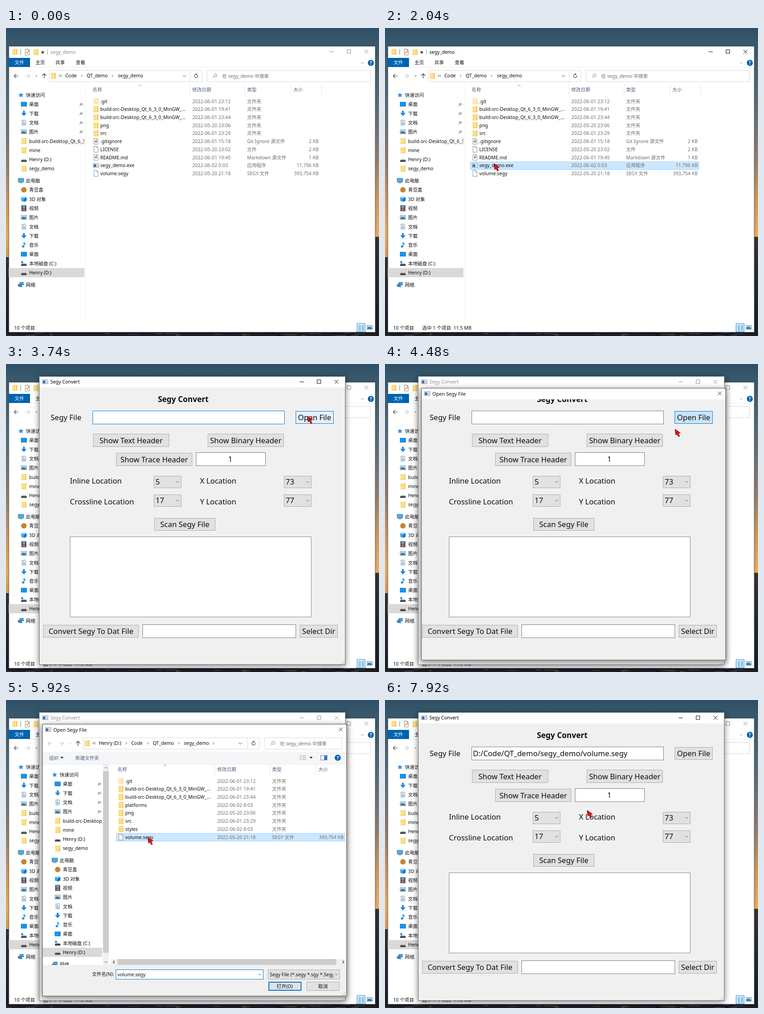
Animation, 823 px wide and 680 px high, one loop 7.99 s. Source, as an HTML page:

```html
<!DOCTYPE html>
<html lang="zh">
<head>
<meta charset="utf-8">
<title>Segy Convert</title>
<style>
html, body { margin: 0; width: 100%; height: 100%; overflow: hidden; background: #1c1e25; }
svg { display: block; }
text { font: 10.45px "Noto Sans", "Noto Sans CJK SC", "Noto Sans CJK", sans-serif; fill: #0c0c0c; white-space: pre; }
.dim { fill: #6d6d6d; }
.head { fill: #4c5f7c; }
.cap { fill: currentColor; }
.title { font-size: 10.65px; }
.big { font-size: 16.55px; }
.mid { text-anchor: middle; }
.end { text-anchor: end; }
.bold { font-size: 17px; font-weight: 700; }
.shade { filter: drop-shadow(0 3px 7px rgba(0, 0, 0, .5)); }
.soft { filter: drop-shadow(0 1px 3px rgba(0, 0, 0, .25)); }
</style>
</head>
<body>
<svg id="stage" width="823" height="680" viewBox="0 0 823 680"></svg>
<script>
const LOOP = 7990, ROW = 17.72, TOP = 153, TICK = 70;
const BLUE = '#0078d7', GREY = '#adadad', FACE = '#e1e1e1';

// drawing helpers
const text = (x, y, s, cls = '', more = '') => `<text x="${x}" y="${y}" class="${cls}" ${more}>${s}</text>`;
const box = (x, y, w, h, fill, line, more = '') => line
  ? `<rect x="${x + .5}" y="${y + .5}" width="${w - 1}" height="${h - 1}" fill="${fill}" stroke="${line}" ${more}/>`
  : `<rect x="${x}" y="${y}" width="${w}" height="${h}" fill="${fill}" ${more}/>`;
const line = (d, color = '#444', w = 1, fill = 'none', more = '') => `<path d="${d}" fill="${fill}" stroke="${color}" stroke-width="${w}" ${more}/>`;
const shape = (d, fill) => `<path d="${d}" fill="${fill}"/>`;
const dot = (x, y, r, fill) => `<circle cx="${x}" cy="${y}" r="${r}" fill="${fill}"/>`;
const move = (x, y, s) => `<g transform="translate(${x} ${y})">${s}</g>`;
const group = (id, s) => `<g id="${id}">${s}</g>`;
const clip = (x, y, w, h, s) => `<svg x="${x}" y="${y}" width="${w}" height="${h}" viewBox="${x} ${y} ${w} ${h}">${s}</svg>`;
const down = (x, y, c = '#555', r = 3) => line(`M${x - r} ${y - r / 2}l${r} ${r} ${r} ${-r}`, c);
const up = (x, y, c = '#555', r = 3) => line(`M${x - r} ${y + r / 2}l${r} ${-r} ${r} ${r}`, c);
const right = (x, y) => line(`M${x - 1.2} ${y - 2.6}l2.5 2.6 -2.5 2.6`, '#555');
const tri = (x, y, c = '#222') => shape(`M${x - 3.5} ${y - 2}h7l-3.5 4z`, c);
const help = (x, y) => dot(x, y, 6.7, '#0063b1') + text(x, y + 4, '?', 'mid', 'style="fill:#fff;font-weight:700"');

const page = line('M-4.5 -6.5h6l3 3v10h-9z', '#8c8c8c', 1, '#fff') + line('M1.5 -6.5v3h3', '#8c8c8c');
const folder = box(-5.5, -6.5, 11, 13, '#fddf88') + shape('M3.5 -6.5h2v13h-2z', '#f0c964') + shape('M-5.5 5.7h11v.8h-11z', '#e9c467');
const arrow = shape('M-2 -6h4v5h4l-6 7 -6 -7h4z', '#2a84d8');
const drive = shape('M-4.5 0h9l1.5 2.5h-12z', '#9a9a9a') + box(-6, 2, 12, 3.4, '#3c3c3c');
const screen = box(-6.5, -5.5, 13, 9, '#41b0f4', '#3d6f94') + box(-3.5, 4, 7, 1.5, '#6c8496');
const icons = {
  folder, page, drive, arrow, screen,
  pale: `<g opacity=".6">${folder}</g>`,
  gear: page + dot(0, .5, 2.6, '#777') + dot(0, .5, 1, '#fff'),
  mark: page + `<g transform="scale(.5)">${arrow}</g>`,
  app: box(-6.5, -5, 13, 10, '#fff', '#8a99a8') + box(-5, -2.5, 5.5, 6, '#2a6fb5') + box(1.5, -2.5, 3.5, 6, '#c5d3df'),
  star: shape('M0 -5.5l1.6 3.6 4 .3 -3 2.7 1 3.9 -3.6 -2 -3.5 2 .9 -3.9 -3 -2.7 4 -.3z', '#2f8fe0'),
  desk: box(-6.5, -5, 13, 10, '#1296f0', '#0a6fba'),
  doc: box(-4.5, -6, 9, 12, '#fff', '#7e93a6') + line('M-2.5 -3h3M-2.5 -.5h5M-2.5 1.5h5M-2.5 3.5h5', '#3f8fcf'),
  pic: box(-6.5, -5, 13, 10, '#fff', '#8b98a5') + box(-5, -3.5, 10, 4, '#8ccbf2') + shape('M-5 3.5v-3l4 -1.5 6 2v2.5z', '#3b6c88'),
  ball: dot(0, 0, 6, '#c9812f'),
  cube: shape('M-6 -4l6 -2.5 6 2.5 -6 2.5z', '#9fe0fb') + shape('M-6 -4l6 2.5v8l-6 -2.5z', '#36a9e4') + shape('M6 -4l-6 2.5v8l6 -2.5z', '#1173bb'),
  film: box(-5.5, -6.5, 11, 13, '#3a3d42') + box(-3, -5.5, 6, 5, '#6aa7d4') + box(-3, .5, 6, 5, '#a07c6c')
    + line('M-4.4 -6v12M4.4 -6v12', '#ddd', .8, 'none', 'stroke-dasharray="1 1.4"'),
  note: shape('M-.5 -6.5h1.5c0 3 4 3 3.5 7 -1 -2 -2 -2.4 -3.5 -2.6v5.5a2.8 2.3 0 1 1 -1.5 -2z', '#1a8ee0'),
  disk: drive + box(-6, -5, 4.5, 4.5, '#1b9ae8'),
  net: box(-3, -5.5, 9, 7, '#43aef0', '#2b6ea0') + box(-6.5, -1, 8, 5.5, '#2c8fd8', '#27608c') + box(-2, 4, 5, 1.6, '#587488')
};
const icon = (name, x, y) => move(x, y, icons[name]);

// shared panels
const places = [
  ['star', '快速访问'], ['desk', '桌面'], ['arrow', '下载'], ['doc', '文档'], ['pic', '图片'],
  ['folder', 'build-src-Desktop_Qt_6_3_0'], ['folder', 'mine'], ['drive', 'Henry (D:)'], ['folder', 'segy_demo'],
  ['screen', '此电脑'], ['ball', '青豆盒'], ['cube', '3D 对象'], ['film', '视频'], ['pic', '图片'], ['doc', '文档'],
  ['arrow', '下载'], ['note', '音乐'], ['desk', '桌面'], ['disk', '本地磁盘 (C:)'], ['drive', 'Henry (D:)'], ['net', '网络']
];
const placeY = (i, open) => i < 9 ? 148 + 20.3 * i : i < 20 ? 337 + 20.3 * (i - 9) : open ? 566.5 : 364;
function nav(width, pin, open) {
  const chosen = open ? 19 : 9;
  return places.map(([name, label], i) => {
    if (!open && i > 9 && i < 20) return '';
    const y = placeY(i, open), top = i % 20 === 0 || i === 9;
    return (i === chosen ? box(6, y - 10, width, 20.3, '#d9d9d9') : '')
      + icon(name, top ? 33 : 39.5, y) + text(top ? 44 : 51, y + 4, label)
      + (i > 0 && i < 5 ? line(`M${pin - 4} ${y + 4}l3 -3m-2 -2.5l4.5 4.5m-3 -4.5l3 3m-1 -4.5l4 4m-4 -3l-2 2`, '#8a8f96', 1.1) : '');
  }).join('');
}

const G = '文件夹';
const git = ['pale', '.git', '2022-06-01 23:12', G];
const buildA = ['folder', 'build-src-Desktop_Qt_6_3_0_MinGW_...', '2022-06-01 19:41', G];
const buildB = ['folder', buildA[1], '2022-06-01 23:44', G];
const png = ['folder', 'png', '2022-05-20 23:06', G];
const src = ['folder', 'src', '2022-06-01 23:29', G];
const volume = ['page', 'volume.segy', '2022-05-20 21:18', 'SEGY 文件', '393,754 KB'];
const mainRows = [git, buildA, buildB, png, src,
  ['gear', '.gitignore', '2022-06-01 15:18', 'Git Ignore 源文件', '2 KB'],
  ['page', 'LICENSE', '2022-05-20 23:02', '文件', '2 KB'],
  ['mark', 'README.md', '2022-06-01 19:45', 'Markdown 源文件', '1 KB'],
  ['app', 'segy_demo.exe', '2022-06-02 0:03', '应用程序', '11,796 KB'], volume];
const pickRows = [git, buildA, buildB, ['folder', 'platforms', '2022-06-02 8:03', G], png, src,
  ['folder', 'styles', '2022-06-02 8:03', G], volume];

function list(id, rows, chosen) {
  const head = [['名称', 191], ['修改日期', 411], ['类型', 532], ['大小', 634]].map(([s, x]) => text(x, 140, s, 'head')).join('');
  const rules = [405, 527, 628, 696].map(x => box(x, 124, 1, 26, '#e5e5e5')).join('');
  const body = rows.map(([name, label, date, kind, size = ''], i) => {
    const y = 161.5 + ROW * i;
    return icon(name, 198.5, y) + text(208, y + 4, label) + text(411, y + 4, date, 'dim', 'style="font-size:10.55px"')
      + text(532, y + 4, kind, 'dim') + text(690, y + 4, size, 'dim end');
  }).join('');
  return head + rules + up(296, 127, '#777')
    + box(188, 0, 505, 18, '#e5f3ff', '', `id="${id}Hover"`)
    + box(188, Math.round(TOP + ROW * chosen), 505, 18, '#cce8ff', '#99d1ff', `id="${id}Pick"`) + body;
}

function bar(w, chevron, back, crumbs, marks, sx, sw) {
  const r = 95 + w;
  return line('M28 106H18m4.5 -4.5l-4.5 4.5 4.5 4.5', back, 1.2) + line('M42 106h10m-4.5 -4.5l4.5 4.5 -4.5 4.5', '#c4c4c4', 1.2)
    + down(67, 106, back, 2) + line('M84.5 111v-10m-4.5 4.5l4.5 -4.5 4.5 4.5', '#444', 1.3)
    + box(95, 93, w, 26, '#fff', '#d9d9d9') + box(r - 27, 94, 1, 24, '#d9d9d9') + icon('folder', 104.5, 105.5)
    + line('M119.5 103l-2.5 2.5 2.5 2.5m3.5 -5l-2.5 2.5 2.5 2.5', '#333')
    + crumbs.map(([s, x]) => text(x, 109, s)).join('') + marks.map(x => right(x, 105.5)).join('')
    + down(chevron, 106, '#444', 3.5) + line(`M${r - 10} 104.5a3.7 3.7 0 1 1 -3 -2.3m-.5 -2l2 2 -2 1.8`, '#444', 1.2)
    + box(sx, 93, sw, 26, '#fff', '#d9d9d9')
    + line(`M${sx + 13} 110l3.5 -3.5a3.3 3.3 0 1 1 1 1`, '#777') + text(sx + 34, 109.5, '在 segy_demo 中搜索', 'dim');
}
const buttons = (x, y, gap) => line(`M${x} ${y}h9M${x + gap} ${y - 4.5}h8v8h-8zM${x + 2 * gap} ${y - 4.5}l8.5 8.5m0 -8.5l-8.5 8.5`, 'currentColor');
const grip = (x, y) => [[6, 0], [3, 3], [6, 3], [0, 6], [3, 6], [6, 6]].map(([a, b]) => box(x + a, y + b, 1.6, 1.6, '#b4b4b4')).join('');

function fade(id, stops) {
  const body = stops.map(([at, c]) => `<stop offset="${at}" stop-color="${c}"/>`).join('');
  return `<linearGradient id="${id}" x2="0" y2="1">${body}</linearGradient>`;
}
function wallpaper() {
  let seed = 7, bits = '';
  const rnd = () => (seed = seed * 16807 % 2147483647) / 2147483647;
  for (let i = 0; i < 34; i++) bits += box(rnd() * 820, 672 + rnd() * 7, 6 + rnd() * 22, 1 + rnd() * 2, ['#3b3a41', '#121319', '#4a423f'][i % 3]);
  return '<defs>'
    + fade('sky', [[0, '#2e5066'], [.06, '#3b5b6e'], [.25, '#5d7079'], [.42, '#937f72'], [.56, '#d49a5c'], [.67, '#f0ad5c'], [.75, '#dd9a55']])
    + fade('ground', [[0, '#34343b'], [.5, '#272930'], [1, '#1c1e25']]) + '</defs>'
    + box(0, 0, 823, 680, 'url(#sky)') + box(0, 506, 412, 174, 'url(#ground)') + box(412, 461, 411, 219, 'url(#ground)') + bits;
}

const explorer = group('explorer',
  box(6, 40, 809, 632, '#fff', '#75818a', 'class="soft"')
  + icon('folder', 19.5, 52.5) + box(32, 47, 1, 12, '#777') + move(47, 53, page) + line('M44.5 53l2 2.5 4 -5', '#c2782a', 1.3)
  + icon('folder', 66, 53) + box(78, 51, 6, 1, '#222') + tri(81, 55) + box(91, 47, 1, 12, '#999')
  + text(98, 57, 'segy_demo', 'cap') + buttons(714, 52.5, 38.5)
  + box(6, 66, 47, 20, '#0063b1') + text(19, 80, '文件', '', 'style="fill:#fff"')
  + text(65, 80, '主页') + text(109, 80, '共享') + text(154, 80, '查看')
  + down(786, 77, '#888') + help(805, 77) + box(7, 86, 807, 1, '#ececec')
  + bar(338, 394, '#444', [['Code', 131], ['QT_demo', 178], ['segy_demo', 247]], [167, 235], 443, 362)
  + clip(6, 120, 167, 530, nav(167, 166, true)) + box(175, 122, 1, 530, '#f2f2f2')
  + list('main', mainRows, 8)
  + text(18, 666, '10 个项目') + text(82, 666, '选中 1 个项目  11.5 MB', '', 'id="picked"')
  + box(774, 652, 19, 19, '#cce8ff', '#26a0da')
  + line('M778 657.5h5m2 0h5m-12 3h5m2 0h5m-12 3h5m2 0h5m-12 3h5m2 0h5', '#4c7896') + icon('pic', 802.5, 661));

const button = (x, y, w, h, s, id = '') => box(x, y, w, h, FACE, GREY, id && `id="${id}"`) + text(x + w / 2, y + h / 2 + 6, s, 'big mid');
const combo = (x, y, s) => box(x, y, 61, 27, FACE, GREY) + text(x + 4, y + 19.3, s, 'big') + down(x + 52.5, y + 13.5);
const widgets = group('widgets',
  text(391, 84, 'Segy Convert', 'bold mid') + text(98.5, 124, 'Segy File', 'big')
  + box(191, 103, 424, 30, '#fff', '#7a7a7a', 'id="field"') + box(194, 108, 1, 20, '#000', '', 'id="caret"')
  + text(194, 123.5, 'D:/Code/QT_demo/segy_demo/volume.segy', 'big', 'id="path"')
  + button(639, 104, 84, 28, 'Open File', 'open')
  + button(192, 154, 168, 29, 'Show Text Header') + button(445, 154, 168, 29, 'Show Binary Header')
  + button(243, 196, 168, 29, 'Show Trace Header') + box(419, 195, 154, 30, '#fff', '#7a7a7a') + text(495, 216, '1', 'big mid')
  + text(141, 264, 'Inline Location', 'big') + text(428, 264, 'X Location', 'big')
  + text(141, 309.5, 'Crossline Location', 'big') + text(428, 309.5, 'Y Location', 'big')
  + combo(326, 247, '5') + combo(326, 288, '17') + combo(613, 247, '73') + combo(613, 288, '77')
  + button(327, 340, 135, 28, 'Scan Segy File') + box(141, 381, 533, 178, '#fff', '#828790')
  + button(82, 576, 211, 28, 'Convert Segy To Dat File') + box(301, 575, 339, 30, '#fff', '#7a7a7a')
  + button(648, 576, 84, 28, 'Select Dir'));
const app = group('app',
  box(73, 27, 676, 637, '#f0f0f0', '#6b6b6b', 'class="shade" id="frame"') + box(74, 28, 674, 24, '#fff')
  + icon('app', 86.5, 39) + text(98, 43, 'Segy Convert', 'cap') + buttons(648, 39.5, 38.5) + grip(739, 655) + widgets);

const picker = group('picker',
  box(80, 53, 672, 601, '#f0f0f0', '#5e5e5e', 'class="shade"')
  + group('ghost', clip(81, 78, 670, 575, '<use href="#widgets"/>'))
  + box(81, 54, 670, 24, '#fff') + icon('app', 93, 65) + text(104.5, 69.5, 'Open Segy File', 'title') + line('M734.5 61l8 8m0 -8l-8 8', '#222')
  + group('content',
    box(81, 78, 670, 507, '#fff')
    + move(74.5, -10, bar(390, 442.5, '#c4c4c4', [['Henry (D:)', 130.5], ['Code', 202], ['QT_demo', 249.5], ['segy_demo', 318]], [191, 239, 307], 496, 171))
    + box(81, 114, 670, 27, '#f5f6f7') + box(81, 141, 670, 1, '#e8e9ea')
    + text(95, 131.5, '组织', 'head') + tri(123.5, 127.5, '#1f2d44') + text(153, 131.5, '新建文件夹', 'head')
    + line('M648 123.5h4m2 0h8m-14 4h4m2 0h8m-14 4h4m2 0h8', '#a3aab0', 1.6) + tri(673, 127.5, '#1f2d44')
    + box(694, 122, 15, 11, '#fff', '#4d82b4') + box(702, 123, 6, 9, '#2c7ac3') + help(732, 127.5)
    + group('shut', clip(81, 142, 147, 443, move(74.5, 17, nav(147, 146.5, false))))
    + group('wide', clip(81, 142, 132, 443, move(74.5, 17, nav(132, 131.5, true))) + right(458, 95.5)
      + box(214, 142, 13, 443, '#f0f0f0') + box(214, 157, 13, 401, '#cdcdcd') + up(220.5, 149.5) + down(220.5, 578.5))
    + clip(230, 140, 520, 430, move(55, 17, list('file', pickRows, 7)))
    + box(231, 572, 520, 13, '#f0f0f0') + box(246, 572, 483, 13, '#cdcdcd')
    + line('M239.5 575.5l-3 3 3 3M742.5 575.5l3 3 -3 3', '#333', 1.3)
    + text(238, 609, '文件名(N):', 'end') + box(242, 595, 326, 22, '#fff', BLUE) + down(560, 606)
    + text(246, 609.5, 'volume.segy', '', 'id="name"') + box(245, 599, 1, 14, '#000', '', 'id="bar"')
    + box(578, 595, 159, 22, FACE, GREY) + clip(580, 596, 142, 20, text(582, 609.5, 'Segy File (*.segy *.sgy *.Segy')) + down(729, 606)
    + box(579.5, 622.5, 72, 19, FACE, BLUE, 'id="ok" stroke-width="2"') + text(615, 635.5, '打开(O)', 'mid')
    + box(663, 622, 73, 20, FACE, GREY) + text(699.5, 635.5, '取消', 'mid')
    + grip(741, 645)));

const pointer = group('pointer', line('M0 0L1.5 13 4.3 10.6 7.5 16.5 10.2 15 7 9.5 11.7 8.3z', '#5a0a0a', .9, '#f00505'));

document.getElementById('stage').innerHTML = wallpaper() + explorer + app + picker + pointer;

// pointer stops: time, x, y, eased departure
const route = [
  [460, 742, 660, 1], [1230, 245, 300], [1370, 240.5, 299.5], [2770, 240.5, 299.5, 1], [3130, 634, 144], [3330, 634, 144, 1],
  [3740, 665, 115], [4340, 665, 115], [4480, 640, 144], [4750, 526, 226], [5180, 330, 315], [5390, 313, 303],
  [5920, 313, 303, 1], [6410, 622, 636], [6550, 627, 639], [6700, 627, 639], [7050, 625, 631], [7710, 625, 631], [7920, 446, 243.5]
];
function pointerAt(t) {
  let i = route.length - 1;
  while (i > 0 && route[i][0] > t) i--;
  const [t0, x, y, soft] = route[i], [t1, x1, y1] = route[i + 1] || [t0 + 1, x, y];
  let k = Math.max(0, Math.floor((t - t0) / TICK) * TICK / (t1 - t0));
  if (k > 1) k = 1;
  if (soft) k = k * k * (3 - 2 * k);
  return [x + (x1 - x) * k, y + (y1 - y) * k];
}

const el = {};
document.querySelectorAll('[id]').forEach(e => el[e.id] = e);
const show = (id, on) => { el[id].style.display = on ? '' : 'none'; };
const paint = (id, fill, stroke) => { el[id].setAttribute('fill', fill); el[id].setAttribute('stroke', stroke); };
function hover(id, x, y, count, on) {
  const i = Math.floor((y - TOP) / ROW), hit = on && i >= 0 && i < count && x >= 188 && x < 693;
  show(id, hit);
  if (hit) el[id].setAttribute('y', Math.round(TOP + ROW * i));
}

function draw(t) {
  const [x, y] = pointerAt(t), within = (a, b) => t >= a && t < b;
  show('pointer', t >= 460);
  el.pointer.setAttribute('transform', `translate(${x} ${y})`);

  el.explorer.style.color = within(1770, 2370) ? '#000' : '#8a8a8a';
  show('picked', t >= 1770);
  show('mainPick', t >= 1770);
  hover('mainHover', x, y, 10, within(460, 1770));

  const active = t < 3940 || t >= 7390;
  show('app', t >= 2370);
  el.app.style.opacity = t < 2440 ? .6 : 1;
  el.app.style.color = active ? '#000' : '#8f8f8f';
  paint('frame', '#f0f0f0', active ? '#6b6b6b' : '#8f8f8f');
  paint('field', '#fff', t < 3940 ? BLUE : '#7a7a7a');
  show('caret', within(2770, 3330));
  show('path', t >= 7390);
  const over = x >= 639 && x < 723 && y >= 104 && y < 132;
  if (!active) paint('open', '#cce4f7', BLUE);
  else if (over) paint('open', '#e5f1fb', BLUE);
  else paint('open', FACE, GREY);

  show('picker', within(4410, 7390));
  el.picker.style.opacity = t >= 7320 ? .5 : 1;
  show('ghost', t < 4550);
  show('content', t >= 4550);
  show('shut', t < 4890);
  show('wide', t >= 4890);
  show('filePick', t >= 5650);
  hover('fileHover', x - 55, y - 17, 8, within(4550, 5650));
  show('name', t >= 5650);
  show('bar', t < 5110);
  paint('ok', x >= 579 && x < 652 && y >= 622 && y < 642 ? '#e5f1fb' : FACE, BLUE);
}

const start = performance.now();
(function tick() {
  draw((performance.now() - start) % LOOP);
  requestAnimationFrame(tick);
})();
</script>
</body>
</html>
```
